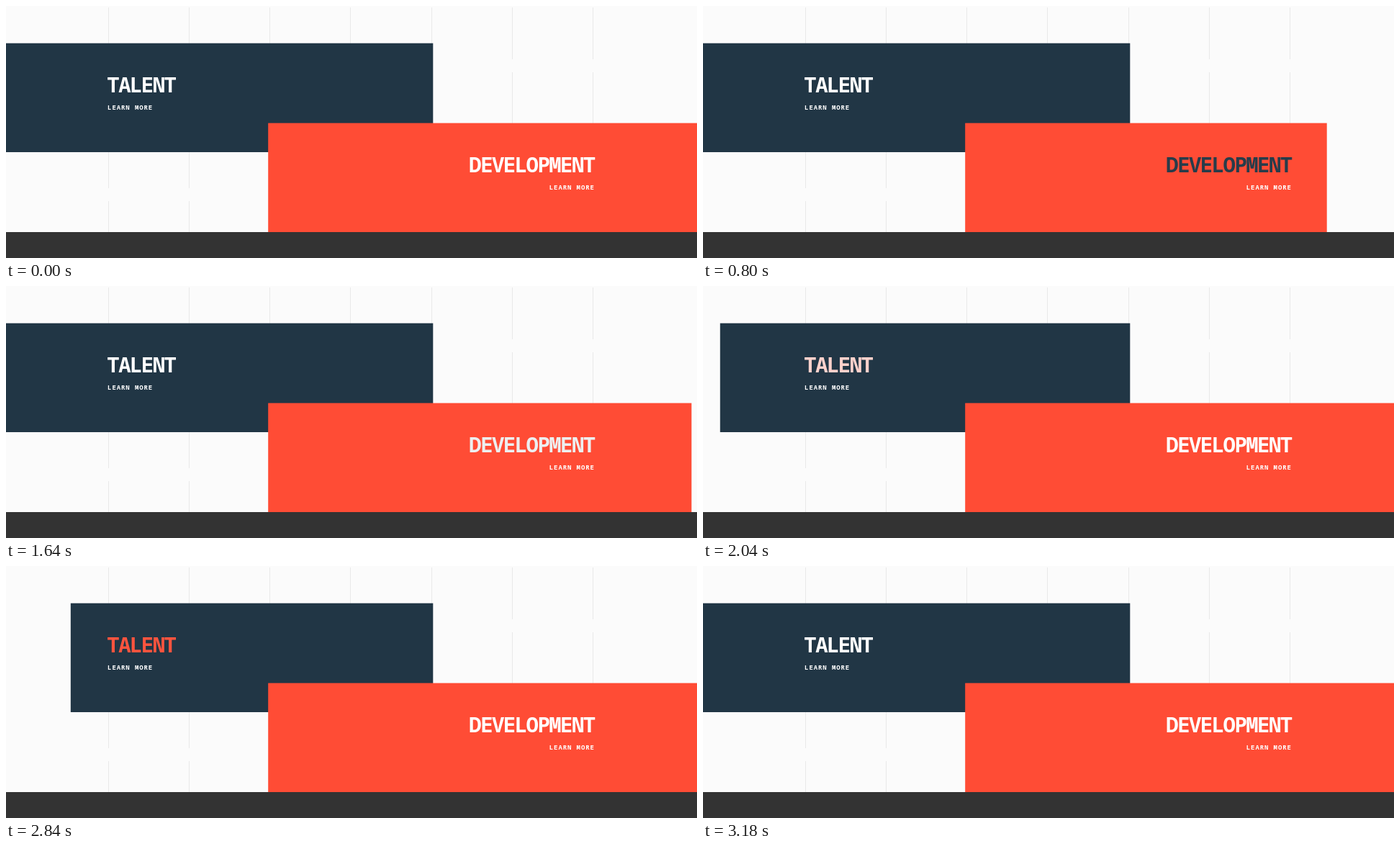
Recreate the animation shown at these times as an HTML page with a canvas. Size 960 by 350 pixels, loop 3560 ms.

```html
<!DOCTYPE html>
<html lang="en">
<head>
<meta charset="utf-8">
<title>Hover panels</title>
<style>
  html, body { margin: 0; width: 100%; height: 100%; overflow: hidden; background: #fbfbfb; }
  canvas { display: block; }
</style>
</head>
<body>
<canvas id="stage" width="960" height="350"></canvas>
<script>
const ctx = document.getElementById('stage').getContext('2d');
const LOOP = 3560, STEP = 20, DURATION = 300;
const WHITE = [255, 255, 255], NAVY = [33, 54, 69], ORANGE = [255, 76, 53];

const mix = (a, b, k) => a + (b - a) * k;
const rgb = c => `rgb(${c.map(Math.round)})`;
const blend = (a, b, k) => rgb(a.map((v, i) => mix(v, b[i], k)));

// cubic-bezier(.4, 0, .2, 1), solved for x by bisection
function ease(x) {
  if (x <= 0) return 0;
  if (x >= 1) return 1;
  let lo = 0, hi = 1, s;
  for (let i = 0; i < 20; i++) {
    s = (lo + hi) / 2;
    const r = 1 - s;
    if (1.2 * r * r * s + 0.6 * r * s * s + s * s * s < x) lo = s; else hi = s;
  }
  return s * s * (3 - 2 * s);
}

const hover = (t, enter, leave) =>
  ease((t - enter) / DURATION) - ease((t - leave) / DURATION);

function box(left, top, right, bottom, color) {
  ctx.fillStyle = color;
  ctx.fillRect(left, top, right - left, bottom - top);
}

// Letters sit centred in cells of equal pitch; x is the centre of the first.
function spaced(text, x, y, pitch, font, color) {
  ctx.font = `${font} "Noto Sans Mono", monospace`;
  ctx.textAlign = 'center';
  ctx.fillStyle = color;
  [...text].forEach((ch, i) => ctx.fillText(ch, x + i * pitch, y));
}

const heading = (text, x, y, color) => spaced(text, x, y, 15.85, 'condensed bold 29px', color);
const link = (x, y) => spaced('LEARN MORE', x, y, 6.3, 'bold 9px', '#fff');

function gridLines() {
  for (let i = 0; i < 7; i++) {
    const x = Math.round(141.6 + i * 112.25);
    for (const [top, bottom] of [[2, 74], [92, 253], [271, 314]]) {
      box(x, top, x + 1, bottom, '#e9e9e9');
    }
  }
}

function draw(t) {
  const development = hover(t, 564, 1440);
  const talent = hover(t, 1963, 2802);

  box(0, 0, 960, 350, '#fbfbfb');
  gridLines();
  box(94 * talent, 51.7, 593.3, 203, rgb(NAVY));
  box(364.2, 162.6, mix(960, 864, development), 314, rgb(ORANGE));
  box(0, 314, 960, 350, '#333');

  heading('TALENT', 149, 120, blend(WHITE, ORANGE, talent));
  link(143.8, 143.5);
  heading('DEVELOPMENT', 652, 231, blend(WHITE, NAVY, development));
  link(757.5, 254.5);
}

const start = performance.now();
function tick() {
  const t = (performance.now() - start) % LOOP;
  draw(Math.floor(t / STEP) * STEP);
  requestAnimationFrame(tick);
}
tick();
</script>
</body>
</html>
```
